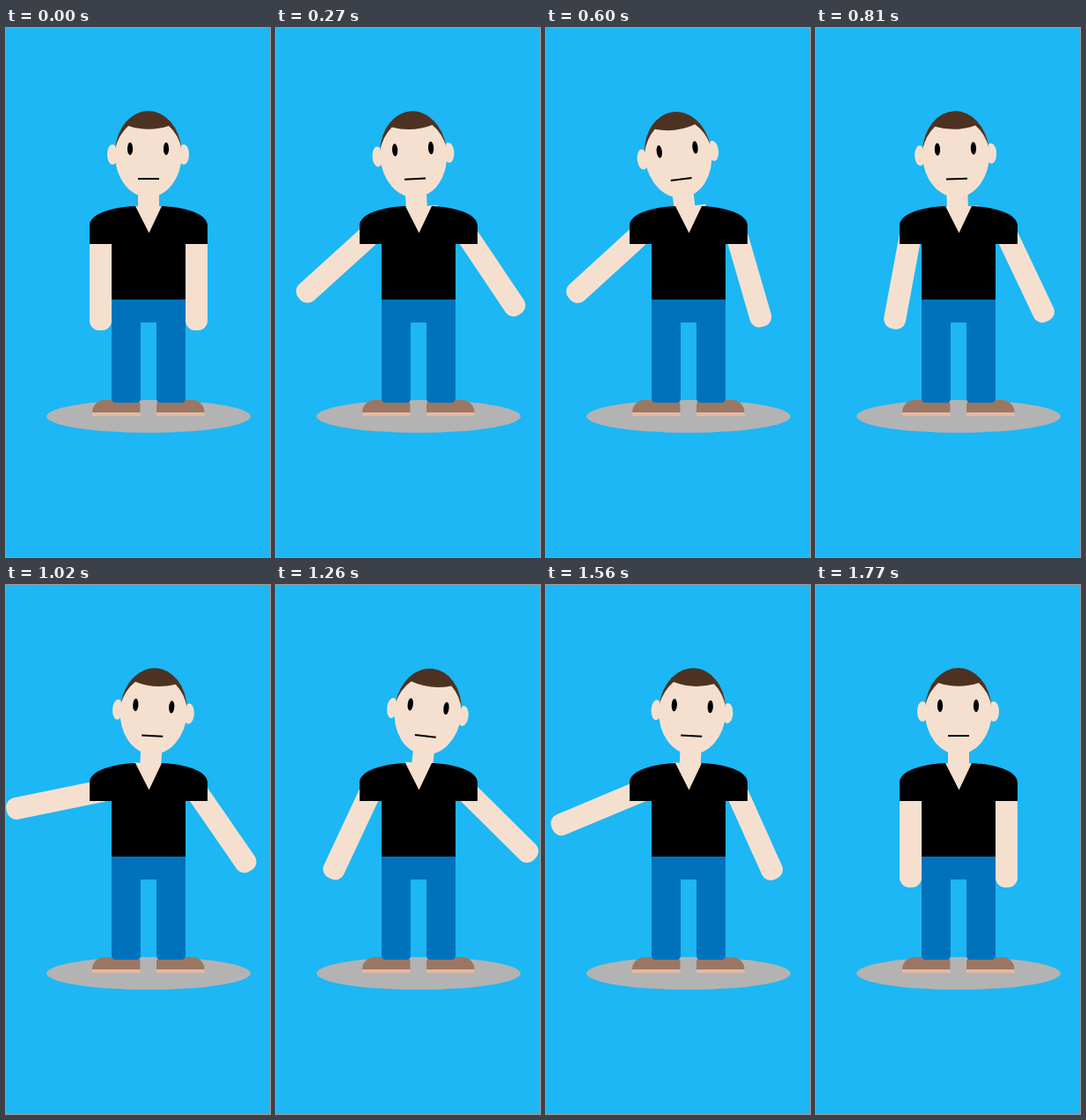
Animation of 300x600 px, one loop 1800 ms. Source, as an HTML page:

```html
<!DOCTYPE html>
<html lang="en">
<head>
<meta charset="utf-8">
<title>Waving man</title>
<style>
  html, body { margin: 0; width: 100%; height: 100%; overflow: hidden; background: #1cb7f4; }
  svg { display: block; width: 100%; height: 100%; }
  .skin { fill: #f5e0cf; }
</style>
</head>
<body>
<svg viewBox="0 0 300 600">
  <ellipse cx="162" cy="440.5" rx="116" ry="18.5" fill="#b3b3b3"/>

  <g id="shoes">
    <path d="M98 436 A14 14 0 0 1 112 422 H147 Q152.500 422 152.500 428 V436Z" fill="#9b7763"/>
    <path d="M98 436 H152.500 V440 H98Z" fill="#e3b9a3"/>
  </g>
  <use href="#shoes" transform="matrix(-1 0 0 1 323.500 0)"/>

  <path d="M120 307 H204 V420 Q204 425 199 425 H176 Q171 425 171 420 V334 H153 V420 Q153 425 148 425 H125 Q120 425 120 420Z" fill="#0072bc"/>

  <rect id="leftArm" class="skin" x="95" y="222" width="25" height="121" rx="11"/>
  <rect id="rightArm" class="skin" x="204" y="222" width="25" height="121" rx="11"/>

  <g id="head">
    <path class="skin" d="M150 180 H174 V202.300 H186 V240 H143 V202.300 H150Z"/>
    <ellipse class="skin" cx="121" cy="143.500" rx="6" ry="11.500"/>
    <ellipse class="skin" cx="202" cy="143.500" rx="6" ry="11.500"/>
    <ellipse class="skin" cx="161.800" cy="143.500" rx="38" ry="48.500"/>
    <path d="M124 137 A38 48.500 0 0 1 199.500 137 Q196 121 185 111 Q162 118.500 139 111 Q128 121 124 137Z" fill="#4d3222"/>
    <ellipse cx="141" cy="137" rx="3.100" ry="7.200"/>
    <ellipse cx="182" cy="137" rx="3.100" ry="7.200"/>
    <path d="M150 171 H174" stroke="#000" stroke-width="2"/>
  </g>

  <path d="M95 245 V224 C95 211 120 203 147 202 L162.500 232.500 L177 202 C204 203 229 211 229 224 V245 H204 V308 H120 V245Z"/>
</svg>
<script>
const LOOP = 1800, FRAME = 30, LAST = LOOP / FRAME - 1;

// keys: [phase, degrees] pairs, joined by straight lines
const parts = [
  { id: 'head', pivot: '162 241', keys: [[0, 0], [.333, -7.1], [.667, 7.4], [1, 0]] },
  { id: 'leftArm', pivot: '107.5 234', keys: [[0, 0], [.255, 80], [.45, 5], [.56, 85], [.763, 5], [.915, 85], [1, 0]] },
  { id: 'rightArm', pivot: '216.5 234', keys: [[0, 0], [.18, -40], [.33, -15.5], [.76, -49], [1, 0]] }
];
for (const part of parts) part.node = document.getElementById(part.id);

function angleAt(keys, phase) {
  const i = Math.max(1, keys.findIndex(key => key[0] >= phase));
  const [p0, a0] = keys[i - 1], [p1, a1] = keys[i];
  return a0 + (a1 - a0) * (phase - p0) / (p1 - p0);
}

function draw() {
  const phase = Math.floor(performance.now() % LOOP / FRAME) / LAST;
  for (const { node, pivot, keys } of parts)
    node.setAttribute('transform', `rotate(${angleAt(keys, phase)} ${pivot})`);
  requestAnimationFrame(draw);
}
draw();
</script>
</body>
</html>
```
